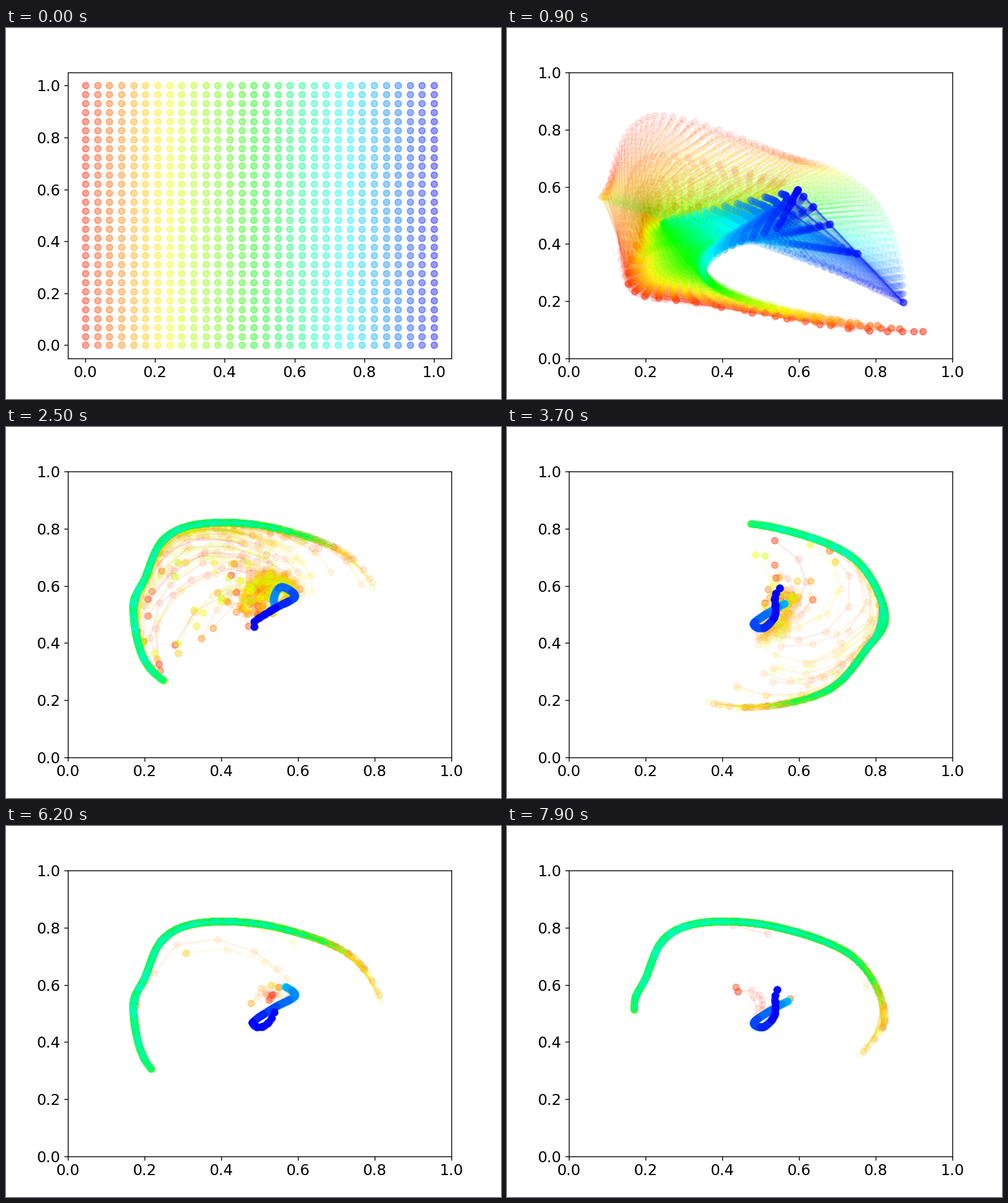
Animation of 768x576 px, one loop 8000 ms. Source, as a matplotlib script:

```python
import colorsys

import matplotlib.pyplot as plt
import numpy as np
from matplotlib.animation import FuncAnimation
from matplotlib.collections import LineCollection

FRAMES, TAIL, SIDE = 80, 5, 30
FOLD, SETTLE = 4, 9        # the grid folds up, then sweeps on to the two loops
LAP, EIGHT = 1076, 200     # loop lengths in pixels

rng = np.random.default_rng(4)

# Key points of the two closed loops, in pixels
OUTER = [(197, 283), (221, 372), (305, 424), (395, 434), (498, 408), (556, 346),
         (586, 290), (537, 203), (420, 157), (310, 149), (245, 173), (215, 235)]
INNER = [(428, 248), (448, 263), (417, 281), (383, 304), (397, 312), (415, 293),
         (416, 262)]


def spline(points, t, closed=False):
    """Catmull-Rom curve through the points; t counts control points."""
    p = np.array(points, float)
    n = len(p)
    i = np.floor(t).astype(int)
    if not closed:
        i = np.minimum(i, n - 2)
    f = (t - i)[..., None]
    a, b, c, d = (p[(i + k) % n if closed else np.clip(i + k, 0, n - 1)]
                  for k in (-1, 0, 1, 2))
    return b + f / 2 * (c - a + f * (2*a - 5*b + 4*c - d + f * (3*b - 3*c + d - a)))


def loop(points):
    """Closed curve as a function of the fraction of its length."""
    dense = spline(points, np.linspace(0, len(points), 1200), True)
    s = np.append(0, np.cumsum(np.hypot(*np.diff(dense, axis=0).T)))
    s /= s[-1]

    def at(u):
        return np.stack([np.interp(u % 1, s, dense[:, k]) for k in (0, 1)], axis=-1)
    return at


def to_data(px):
    return np.stack([(px[..., 0] - 96) / 595.2, (512.64 - px[..., 1]) / 443.52], axis=-1)


def mix(a, b, t):
    return np.asarray(a) * (1 - t) + np.asarray(b) * t


def smooth(t):
    t = np.clip(t, 0, 1)
    return t * t * (3 - 2 * t)


outer, inner = loop(OUTER), loop(INNER)
axis = np.linspace(0, 1, SIDE)
X, Y = np.meshgrid(axis, axis, indexing="ij")
grid = np.stack([X, Y], axis=-1)
shape = X.shape

# Per-point traits: lag on the outer loop, lead on the eight, time of escape
warm = X < 0.3
lag = np.where(warm, 345 * rng.beta(1.3, 2, shape), 240 * rng.beta(1.4, 2.2, shape))
stay = X + rng.uniform(-0.08, 0.08, shape) > 0.66
lead = np.where(stay, np.minimum(650 * (1 - X), 100) * rng.uniform(0.6, 1, shape),
                rng.uniform(55, 110, shape))
escape = np.where(warm, 10 + rng.exponential(13, shape), 4 + rng.exponential(2.5, shape))
base = 0.25 * rng.random(shape) * warm


def sweep(k):
    """Sheet spanned by its red edge, green middle and blue edge."""
    m = 0.6 ** (k - FOLD)
    x, y = X[..., None], Y[..., None]
    track = [mix((395, 290), (450, 205), m), mix((240, 290), (225, 137), m),
             mix((215, 320), (157, 262), m),
             (192, 404), (305, 428), (535, 467), (645, 471)]
    red = spline(track, (1 - Y) * min(k - FOLD + 2, 6))
    green = mix(mix((330, 410), (215, 305), y), mix((200, 280), (570, 270), y), m)
    blue = mix(mix((415, 308), (460, 350), m), mix((437, 236), (615, 426), m),
               1 - (1 - y) ** 3)
    return red * (1 - x) * (1 - 2*x) + green * 4*x * (1 - x) + blue * x * (2*x - 1)


def settled(n):
    o = outer((125 + 57.5 * (n - 25) - lag) / LAP)
    e = inner((62 - 9.65 * (n - 25) - lead) / EIGHT)
    r = 1 / (1 + np.exp(-np.clip((n - escape) / 1.2, -30, 30)))
    r = np.where(stay, 0, base + (1 - base) * r)
    return mix(e, o, r[..., None])


def state(n):
    if n < FOLD:
        return mix(grid, to_data(sweep(FOLD)), 1 - (1 - n / FOLD) ** 2)
    if n <= SETTLE:
        return to_data(sweep(n))
    return to_data(mix(sweep(SETTLE), settled(n), smooth((n - SETTLE) / 4)))


path = np.array([state(n) for n in range(FRAMES)])

plt.rcParams["font.size"] = 14
fig, ax = plt.subplots(figsize=(6.4, 4.8), dpi=120)
fig.subplots_adjust(left=0.125, right=0.9, bottom=0.11, top=0.88)
ticks = np.linspace(0, 1, 6)

columns = []
for i, x in enumerate(axis):
    color = colorsys.hsv_to_rgb(0.02 + 0.645 * x, 1, 1)
    z = 2 + i / 100
    lines = LineCollection([], colors=[color], linewidths=1.5, alpha=0.1, zorder=z)
    ax.add_collection(lines, autolim=False)
    dots, = ax.plot([], [], "o", color=color, alpha=0.1, zorder=z + 0.002)
    heads, = ax.plot([], [], "o", color=color, alpha=0.4, zorder=z + 0.004)
    columns.append((lines, dots, heads))


def update(n):
    lim = (-0.05, 1.05) if n == 0 else (0, 1)
    ax.set(xlim=lim, ylim=lim, xticks=ticks, yticks=ticks)
    ax.set(xlim=lim, ylim=lim)
    past = path[max(0, n - TAIL):n + 1]
    for i, (lines, dots, heads) in enumerate(columns):
        lines.set_segments(list(past[:, i].swapaxes(0, 1)) if n else [])
        dots.set_data(past[:-1, i, :, 0].ravel(), past[:-1, i, :, 1].ravel())
        heads.set_data(path[n, i, :, 0], path[n, i, :, 1])
    return [a for group in columns for a in group]


anim = FuncAnimation(fig, update, frames=FRAMES, interval=100, repeat=True,
                     repeat_delay=0, blit=False)
plt.show()
```
